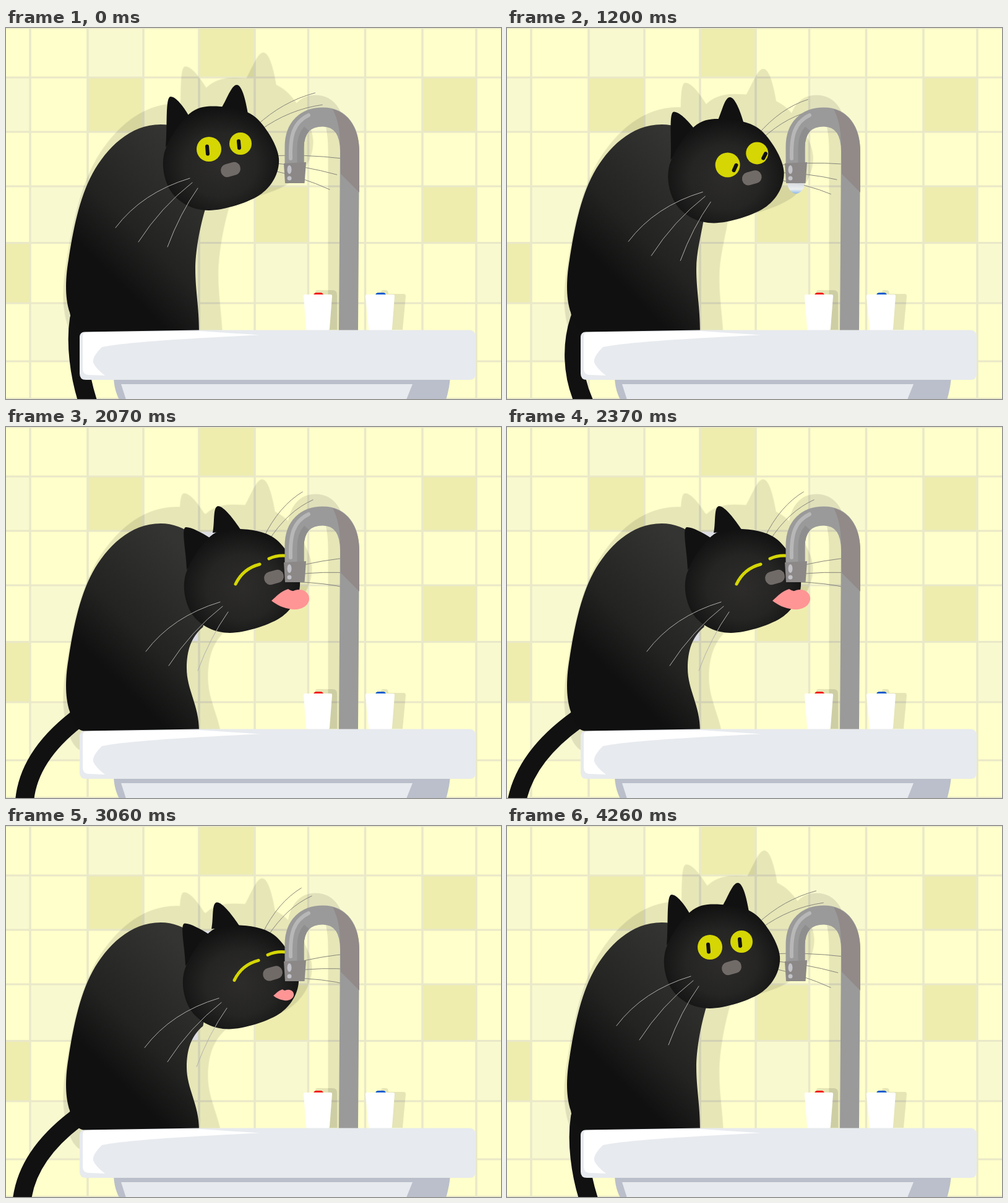
These frames come from a looping animation (800 px wide and 600 px high, 4500 ms). An HTML page:

```html
<!DOCTYPE html>
<html lang="en">
<head>
<meta charset="utf-8">
<title>Cat at the tap</title>
<style>
html, body { margin: 0; width: 100%; height: 100%; overflow: hidden; background: #e9e8c8; }
svg { display: block; width: 800px; height: 600px; }
.line { fill: none; stroke-linecap: round; }
</style>
</head>
<body>
<svg viewBox="0 0 800 600">
  <defs>
    <linearGradient id="fur" gradientUnits="userSpaceOnUse" x1="100" y1="330" x2="260" y2="170">
      <stop offset="0" stop-color="#101010"/>
      <stop offset=".35" stop-color="#232322"/>
      <stop offset=".65" stop-color="#2b2b29"/>
      <stop offset="1" stop-color="#343432"/>
    </linearGradient>
    <radialGradient id="face" cx=".5" cy=".56" r=".56">
      <stop offset="0" stop-color="#2d2c2b"/>
      <stop offset=".55" stop-color="#252524"/>
      <stop offset="1" stop-color="#111"/>
    </radialGradient>
    <linearGradient id="water" x1="0" y1="0" x2="0" y2="1">
      <stop offset="0" stop-color="#d5d9e0"/>
      <stop offset=".6" stop-color="#eef3fa"/>
      <stop offset="1" stop-color="#86b4f0"/>
    </linearGradient>
  </defs>

  <g id="tiles"></g>

  <g opacity=".1">
    <path id="bodyShade"/>
    <g id="headShade"></g>
    <path fill="none" stroke="#000" stroke-width="31" d="M470 165C472 136 484 124 500 124C525 124 536 150 536 200V489"/>
  </g>
  <path opacity=".1" d="M500 488V427Q500 424 504 424H528Q535 424 535 431V488ZM606 488V427Q606 424 610 424H614Q618 424 618 430H643Q646 430 646 434L641 488Z"/>

  <g id="farWhiskers" class="line" stroke="#85847a"></g>
  <path id="tail" class="line" stroke="#111" stroke-width="30"/>
  <path id="body" fill="url(#fur)"/>

  <!-- Head parts are drawn around the middle of the head -->
  <g id="cat">
    <path id="earL" fill="#111"/>
    <path id="earR" fill="#111"/>
    <path id="head" fill="url(#face)"/>
    <g id="openEyes">
      <ellipse id="eyeL" rx="20" fill="#d5d604"/>
      <ellipse id="eyeR" rx="18" fill="#d5d604"/>
      <path id="pupils" class="line" stroke="#111" stroke-width="6"/>
    </g>
    <path id="shutEyes" class="line" stroke="#d5d604" stroke-width="5" d="M-11 5Q1-20 28-27M43-36Q58-43 76-40"/>
    <rect id="nose" x="-16" y="-10.5" width="32" height="21" rx="10" fill="#716b68"/>
    <path id="nearWhiskers" class="line" stroke="#b3b1ad" d="M-51 32Q-128 55-171 112M-47 39Q-98 79-134 135M-38 48Q-67 89-87 143"/>
    <path id="tongue" fill="#ff9595" d="M47 32C55 25 61 17 74 13Q81 18 85 15C98 11 109 19 108 30C106 43 91 47 81 46C66 44 56 39 47 32Z"/>
  </g>

  <path id="drop" fill="url(#water)"/>

  <g fill="none">
    <path stroke="#9a9a9a" stroke-width="31" d="M466 222V192C466 160 485 144 512 144C540 144 555.5 165 555.5 200L553.5 489"/>
    <path fill="#918a89" d="M541 236L571 266V200C571 167 557 140 528 131C537 150 540 165 540 195Z"/>
    <path stroke="#8f8e8e" stroke-width="11" d="M476 220V194C476 180 479 171 486 163"/>
    <path stroke="#b7b7b8" stroke-width="6" stroke-linecap="round" d="M460 211C459 175 464 153 489 141"/>
  </g>
  <path fill="#8b8887" d="M449 219L485 217L482.5 251H451Z"/>
  <g fill="#c3c3c8"><ellipse cx="458" cy="229" rx="3.5" ry="7"/><circle cx="458" cy="243" r="3.5"/></g>

  <path fill="#f21818" d="M497 433Q497 428 502 428H508Q513 428 513 433Z"/>
  <path fill="#0a5bd0" d="M597 433Q597 428 602 428H609Q614 428 614 433Z"/>
  <path fill="#fff" d="M483 431H525Q527 431 527 434L523 486Q523 489 520 489H488Q485 489 485 486L481 434Q481 431 483 431ZM583 431H626Q628 431 628 434L624 486Q624 489 621 489H589Q586 489 586 486L581 434Q581 431 583 431Z"/>

  <path fill="#babfcb" d="M174 566H718Q716 586 711 601H183Q175 586 174 566Z"/>
  <path fill="#e7eaee" d="M186 576H657L647 601H194Z"/>
  <path fill="#e7eaee" d="M128 491.500L312 488.500H749Q759 489 759 499V559Q759 569 749 569H129Q119 569 119 559V499Q120 491 128 491.500Z"/>
  <path fill="#fff" d="M130 492L312 490L410 496.500Q200 506 155 516Q139 532 141 541Q145 551 160 562L134 561Q124 561 124 550V499Q124 492 130 492Z"/>
</svg>

<script>
const LOOP = 4500, STEP = 30;
const $ = id => document.getElementById(id);
const set = (id, attrs) => { for (const k in attrs) $(id).setAttribute(k, attrs[k]); };
const show = (id, on) => $(id).style.display = on ? "" : "none";
const move = (x, y) => `translate(${x} ${y})`;
const ramp = (t, from, to) => Math.min(1, Math.max(0, (t - from) / (to - from)));

function add(parent, tag, attrs) {
  const el = document.createElementNS("http://www.w3.org/2000/svg", tag);
  for (const k in attrs) el.setAttribute(k, attrs[k]);
  return parent.appendChild(el);
}

// Wall: tiles are named by column and row
const cols = [-2, 39, 132, 222, 312, 402, 488.5, 580.5, 673, 760, 803];
const rows = [0, 80, 168, 256, 347.5, 445, 539, 599.5];
const tints = { "#eedeae": [], "#eeedae": "40 21 81 53 83 04", "#f9f9d0": "20 01 61 13 94 15 54", "#f6f7fc": "42 33" };
for (let c = 0; c < 10; c++) for (let r = 0; r < 7; r++)
  add($("tiles"), "rect", {
    x: cols[c] + 1.75, y: rows[r] + 1.5,
    width: cols[c + 1] - cols[c] - 3.5, height: rows[r + 1] - rows[r] - 3,
    fill: Object.keys(tints).find(k => tints[k].includes("" + c + r)) || "#ffffcb"
  });

// Time, head x, head y, turn of ears and whiskers, face shift, gaze, neck lean
const poses = [
  [0, 348, 211, 0, 0, 0, 0],
  [360, 348, 211, 0, 0, 0, 0],
  [780, 350.5, 214.5, .25, .8, 1, 0],
  [1200, 354.5, 231.5, .3, .85, 1.2, 0],
  [1650, 382, 249, 1, 1, .4, 1],
  [3240, 382, 249, 1, 1, .4, 1],
  [3480, 364, 230.5, .45, .8, .4, .57],
  [3750, 348, 211, 0, 0, 0, 0],
  [LOOP, 348, 211, 0, 0, 0, 0]
];
// Time, x of the tail at the stage's lower edge
const swings = [[0, 132], [540, 139], [1080, 139], [1200, 124], [2070, 30], [2300, 16],
  [2670, 16], [3480, 51], [3990, 132], [4110, 139], [4260, 132], [LOOP, 132]];

// Monotone cubic interpolation between keys
function sample(keys, t) {
  let i = 0;
  while (i < keys.length - 2 && keys[i + 1][0] <= t) i++;
  const slope = (k, c) => k < 0 || k > keys.length - 2 ? 0
    : (keys[k + 1][c] - keys[k][c]) / (keys[k + 1][0] - keys[k][0]);
  const tangent = (k, c) => {
    const a = slope(k - 1, c), b = slope(k, c);
    return a * b <= 0 ? 0 : 2 * a * b / (a + b);
  };
  const from = keys[i], to = keys[i + 1];
  const span = to[0] - from[0], u = (t - from[0]) / span, w = 1 - u;
  return from.map((v, c) =>
    v * (1 + 2 * u) * w * w + to[c] * u * u * (3 - 2 * u)
    + span * u * w * (w * tangent(i, c) - u * tangent(i + 1, c))).slice(1);
}

// Smooth closed curve through points
function blob(pts) {
  const n = pts.length, at = i => pts[(i + n) % n];
  const knob = (i, dir) => [0, 1].map(k => at(i)[k] + dir * (at(i + 1)[k] - at(i - 1)[k]) / 6);
  return `M${at(0)}` + pts.map((_, i) => `C${knob(i, 1)} ${knob(i + 1, -1)} ${at(i + 1)}`).join("") + "Z";
}

function ear(ax, ay, x, y, bx, by) {
  const mix = (a, b, k) => a + (b - a) * k;
  return `M${ax} ${ay}C${mix(ax, x, .4)} ${mix(ay, y, .4)} ${x - 9} ${y} ${x} ${y}`
    + `C${x + 9} ${y} ${mix(bx, x, .45) + 5} ${mix(by, y, .45)} ${bx} ${by}Z`;
}
const leftEar = turn => ear(-90, -18, -82 - 9 * turn, -100 + 13 * turn, -53, -70);
const rightEar = turn => ear(-2 - 46 * turn, -78, 25 - 64 * turn, -119 - 2 * turn, 44 - 46 * turn, -66 - 16 * turn);

function torso(lean, drop) {
  const waist = 306 - 14 * lean, x = 322 - .2 * drop + 4 * lean, y = 293 + .8 * drop;
  return `M312 491C312 450 ${waist} 425 ${waist} 390C${waist} 362 ${313 - 14 * lean} ${y + 30 - 14 * lean} ${x} ${y}`
    + "L335 230C325 185 290 156 250 156C200 156 163 194 140 235C118 275 108 330 101 375"
    + "C95 410 96 440 103 460C106 478 116 492 128 492Z";
}

function tailPath(tip) {
  const out = Math.max(0, (132 - tip) / 116) ** .7;
  return `M${118 - 6 * out} ${471 + 3 * out}C${112 - 50 * out} 510 ${118 - 91 * out} ${560 - 8 * out} ${tip} 604`;
}

const headPath = blob([[-52, -72], [-2, -84], [56, -66], [93, 0], [65, 57], [-20, 84], [-78, 58], [-93, -5]]);
set("head", { d: headPath });
[headPath, leftEar(0), rightEar(0)].forEach(d => add($("headShade"), "path", { d }));

// Far whiskers fan out from the head by angle, the upper ones bending and turning more
const polar = (r, deg) => [r * Math.cos(deg * Math.PI / 180), -r * Math.sin(deg * Math.PI / 180)];
const fan = [35, 28, 0, -8, -16].map(angle => {
  const upper = angle > 20;
  return {
    angle, bend: upper ? 8 : 3, gain: upper ? 21 : 12,
    length: upper ? 185 : 195 + .8 * angle,
    el: add($("farWhiskers"), "path", {})
  };
});

function drawEyes(side, gaze, lid) {
  show("openEyes", lid > .15);
  show("shutEyes", lid <= .15);
  show("pupils", lid > .6);
  const eyes = [["eyeL", -20 + 26 * side, -15 + 5 * Math.min(1, gaze), 20], ["eyeR", 31 + 22 * side, -24 - 6 * side, 18]];
  let marks = "";
  for (const [id, x, y, r] of eyes) {
    set(id, { cx: x, cy: y, ry: r * lid });
    const dx = .5 - 2 * gaze, dy = (6 - 1.5 * gaze) * r / 20;
    marks += `M${x - 2.5 + 12 * gaze - dx} ${y + 1.5 + 2.5 * gaze - dy}l${2 * dx} ${2 * dy}`;
  }
  set("pupils", { d: marks });
}

function draw(t) {
  const [x, y, turn, side, gaze, lean] = sample(poses, t);
  const fall = y - 211;

  // One lap of the tongue every 300 ms
  const lapping = t >= 1770 && t <= 3270;
  const beat = lapping ? .5 - .5 * Math.cos((t - 2070) / 300 * 2 * Math.PI) : 0;
  const spot = move(x - 3 * beat, y - 7 * beat);

  set("cat", { transform: spot });
  set("earL", { d: leftEar(turn) });
  set("earR", { d: rightEar(turn) });
  set("nose", { transform: move(15 + 28 * side + 8 * turn, 18 - 24 * turn) + "rotate(-16)" });
  set("nearWhiskers", { transform: move(15 * side, 2 * side) });
  drawEyes(side, gaze, 1 - ramp(t, 1440, 1590) + ramp(t, 3240, 3330));

  set("farWhiskers", { transform: spot });
  for (const { angle, bend, gain, length, el } of fan) {
    const a = angle + gain * turn;
    el.setAttribute("d", `M${polar(78, a + bend)}Q${polar(135, a + bend)} ${polar(length * (1 - .06 * side), a)}`);
  }

  const d = torso(lean, fall);
  set("body", { d });
  set("bodyShade", { d, transform: move(-24, -62 + 7 * side) + "scale(1.2 1.18)" });
  set("headShade", { transform: move(386.6 - 2 * side, 180 + fall + 7 * side) + "scale(1.18)" });
  set("tail", { d: tailPath(sample(swings, t)[0]) });

  const out = (ramp(t, 1620, 1770) - ramp(t, 3150, 3270)) * (1 - .7 * beat);
  show("tongue", out > .02);
  set("tongue", { transform: move(58 * (1 - out), 28 * (1 - out)) + `scale(${out})` });

  const size = 18 * (t - 360) / 840 * (1 - ramp(t, 1590, 1680));
  const tip = 250 + size, hip = 250 + size / 2;
  show("drop", size > .3);
  set("drop", { d: `M453 250H481C481 ${hip} 474 ${tip} 467 ${tip}C460 ${tip} 453 ${hip} 453 250Z`, opacity: ramp(size, 0, 20) });
}

const start = performance.now();
function tick() {
  const t = (performance.now() - start) % LOOP;
  draw(Math.floor(t / STEP) * STEP);
  requestAnimationFrame(tick);
}
tick();
</script>
</body>
</html>
```
